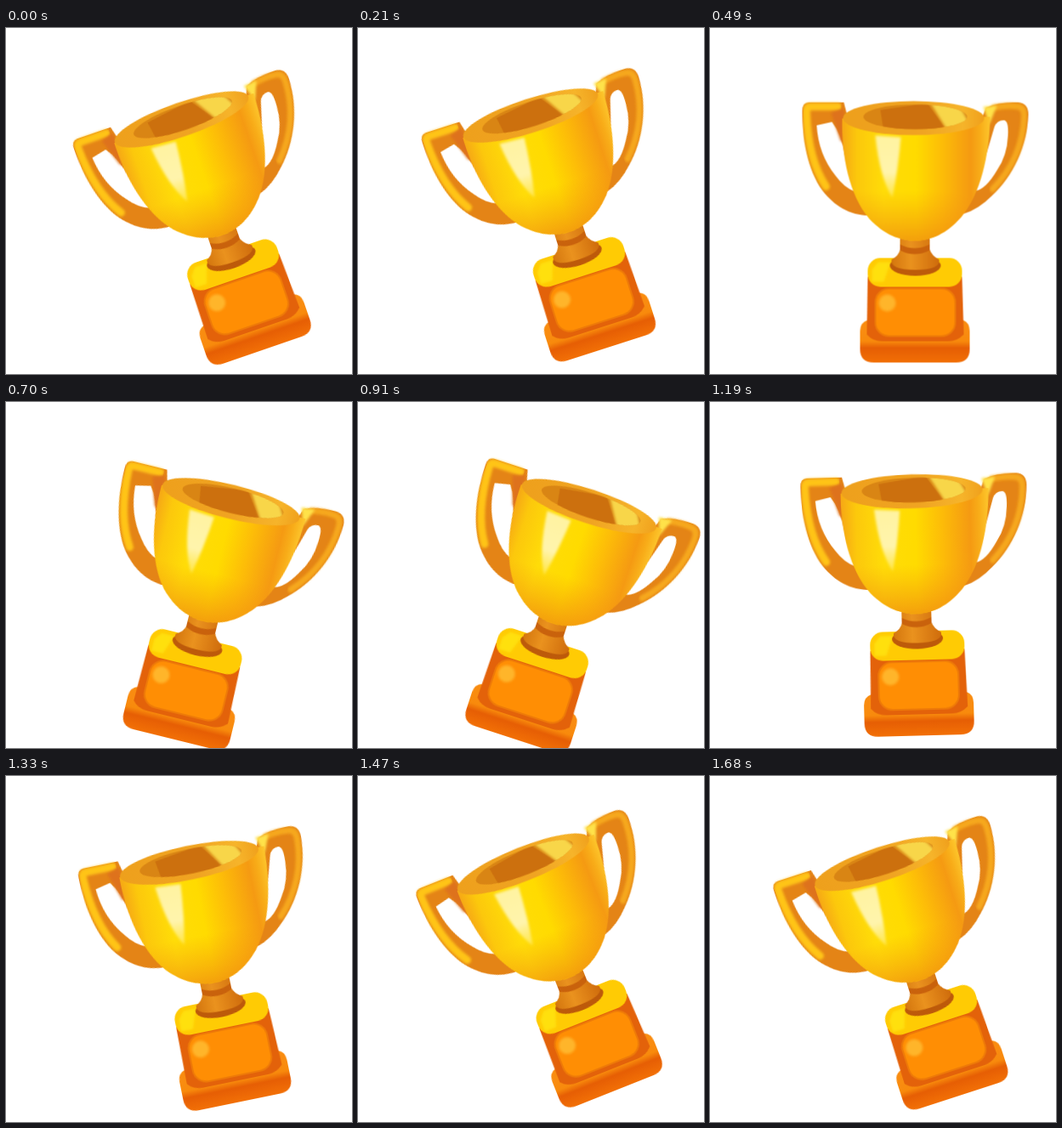
An HTML page that plays this animation: 407x407 px, repeating every 1750 ms.

```html
<!DOCTYPE html>
<html lang="en">
<head>
<meta charset="utf-8">
<title>Swinging trophy</title>
<style>
  html, body { margin: 0; width: 100%; height: 100%; overflow: hidden; background: #fff; }
  svg { display: block; width: 100vw; height: 100vh; }
</style>
</head>
<body>
<svg viewBox="0 0 407 407">
  <defs>
    <linearGradient id="cup">
      <stop offset="0" stop-color="#f6a815"/>
      <stop offset=".1" stop-color="#fcc80c"/>
      <stop offset=".28" stop-color="#ffdc08"/>
      <stop offset=".5" stop-color="#ffdb00"/>
      <stop offset=".68" stop-color="#fdbc08"/>
      <stop offset=".87" stop-color="#f59a12"/>
      <stop offset=".93" stop-color="#f8ac18"/>
      <stop offset="1" stop-color="#fdc62c"/>
    </linearGradient>
    <linearGradient id="shade" x2="0" y2="1">
      <stop offset=".6" stop-color="#f59a10" stop-opacity="0"/>
      <stop offset="1" stop-color="#f08c10" stop-opacity=".75"/>
    </linearGradient>
    <linearGradient id="shine" x2="0" y2="1">
      <stop offset="0" stop-color="#fff3a0"/>
      <stop offset=".6" stop-color="#fff4ac"/>
      <stop offset="1" stop-color="#ffec70" stop-opacity=".6"/>
    </linearGradient>
    <linearGradient id="rim">
      <stop offset="0" stop-color="#eea01c"/>
      <stop offset=".55" stop-color="#f0a422"/>
      <stop offset=".85" stop-color="#f6b42a"/>
      <stop offset="1" stop-color="#f0a01c"/>
    </linearGradient>
    <linearGradient id="stem">
      <stop offset="0" stop-color="#d4760e"/>
      <stop offset=".4" stop-color="#ea921e"/>
      <stop offset="1" stop-color="#cf6c0c"/>
    </linearGradient>
    <linearGradient id="plinth" x2="0" y2="1">
      <stop offset=".3" stop-color="#f98c10"/>
      <stop offset=".5" stop-color="#f88a0c"/>
      <stop offset=".66" stop-color="#e65e04"/>
      <stop offset="1" stop-color="#f27006"/>
    </linearGradient>
    <filter id="soft"><feGaussianBlur stdDeviation="1.6"/></filter>
    <filter id="edge"><feGaussianBlur stdDeviation=".6"/></filter>
    <clipPath id="mouth"><ellipse cx="241" cy="104" rx="61" ry="14.5"/></clipPath>
    <path id="bowl" d="M155 106C154 150 163 196 187 224C205 243 222 249 241 250C260 249 277 242 295 222C318 194 328 150 329 104Z"/>
  </defs>

  <g id="trophy" filter="url(#edge)">
    <!-- pedestal -->
    <path fill="url(#plinth)" d="M185 343H297Q305 346 305 356V377Q305 393 289 393H192Q176 393 176 377V356Q176 346 185 343Z"/>
    <path fill="#e3620a" d="M185 292H296L298 360Q290 368 280 368H202Q191 368 184 360Z"/>
    <rect x="185" y="270" width="111" height="34" rx="15" fill="#ffcb04"/>
    <path d="M197 275H212L204 298H190V284Z" fill="#ffe010" filter="url(#soft)"/>
    <rect x="194" y="306" width="94" height="56" rx="16" fill="#ff8e04" stroke="#ee7a08" stroke-width="2"/>
    <circle cx="208" cy="323" r="10" fill="#ffb52c" filter="url(#soft)"/>

    <!-- stem -->
    <ellipse cx="241" cy="279" rx="30" ry="12" fill="#bd5a0a"/>
    <path fill="url(#stem)" d="M223 246H258V260Q260 267 269 272Q271 284 241 284Q211 284 213 272Q222 267 223 260Z"/>
    <path fill="#c9620c" d="M223 254Q240 263 258 254V261Q240 270 223 261Z"/>

    <!-- handles -->
    <path fill="#e48416" fill-rule="evenodd" d="M116 87H157L190 220C165 221 146 209 132 191C114 166 108 130 108 97Q108 87 116 87ZM125 114Q127 148 147 173Q157 187 170 192L158 150Q154 124 143 110Z"/>
    <path fill="none" stroke="#ffc414" stroke-width="9" stroke-linecap="round" d="M150 92H118Q113 92 113 99C114 130 120 162 136 186" filter="url(#soft)"/>
    <path fill="#de721c" d="M142 99L157 94L161 136L153 132Z" filter="url(#soft)"/>
    <path fill="#e48416" fill-rule="evenodd" d="M324 93Q340 86 362 87Q374 88 374 101C373 138 356 174 331 197Q315 213 298 218L318 110ZM334 116Q324 150 312 191Q324 189 337 167Q349 150 350 126Q351 108 345 108Q337 108 334 116Z"/>
    <path fill="none" stroke="#f6a81c" stroke-width="7" stroke-linecap="round" d="M334 93Q350 90 362 92Q369 93 369 103C368 135 355 165 332 189" filter="url(#soft)"/>
    <path fill="#ffe24a" d="M321 92L337 91L328 113Z" filter="url(#soft)"/>

    <!-- cup -->
    <use href="#bowl" fill="url(#cup)"/>
    <use href="#bowl" fill="url(#shade)"/>
    <path fill="url(#shine)" d="M194 126L224 128Q221 165 214 199Q199 175 194 126Z" filter="url(#soft)"/>
    <ellipse cx="239" cy="105.500" rx="83" ry="20" fill="url(#rim)"/>
    <g clip-path="url(#mouth)">
      <rect x="170" y="85" width="145" height="40" fill="#d98514"/>
      <path fill="#cc700e" d="M200 96L255 88L280 122H204Z"/>
      <path fill="#f8d648" d="M258 86H290L310 122H280Z" filter="url(#soft)"/>
    </g>
  </g>
</svg>
<script>
const LOOP = 1750, STEP = 70, PIVOT = [240, 256];

// time in ms, tilt in degrees, position of the neck
const POSES = [
  [0, -19, 256.5, 249.5],
  [70, -19.7, 252.5, 247],
  [210, -17.8, 250, 246],
  [490, 0, 240.5, 256.5],
  [770, 18.5, 226, 266],
  [840, 22, 224, 267],
  [910, 18.1, 226, 266],
  [1190, -1.5, 242.5, 255.5],
  [1470, -21.7, 251, 243],
  [1540, -22, 249, 242],
  [1680, -18, 250, 246],
  [1750, -19, 256.5, 249.5]
];
const trophy = document.getElementById('trophy');

function poseAt(time) {
  const next = POSES.findIndex(pose => pose[0] > time);
  const a = POSES[next - 1], b = POSES[next];
  const k = (time - a[0]) / (b[0] - a[0]);
  return a.map((value, i) => value + (b[i] - value) * k);
}

function draw() {
  const time = Math.floor(performance.now() % LOOP / STEP) * STEP;
  const [, tilt, x, y] = poseAt(time);
  trophy.setAttribute('transform',
    `translate(${x} ${y}) rotate(${tilt}) translate(${-PIVOT[0]} ${-PIVOT[1]})`);
  requestAnimationFrame(draw);
}
draw();
</script>
</body>
</html>
```
